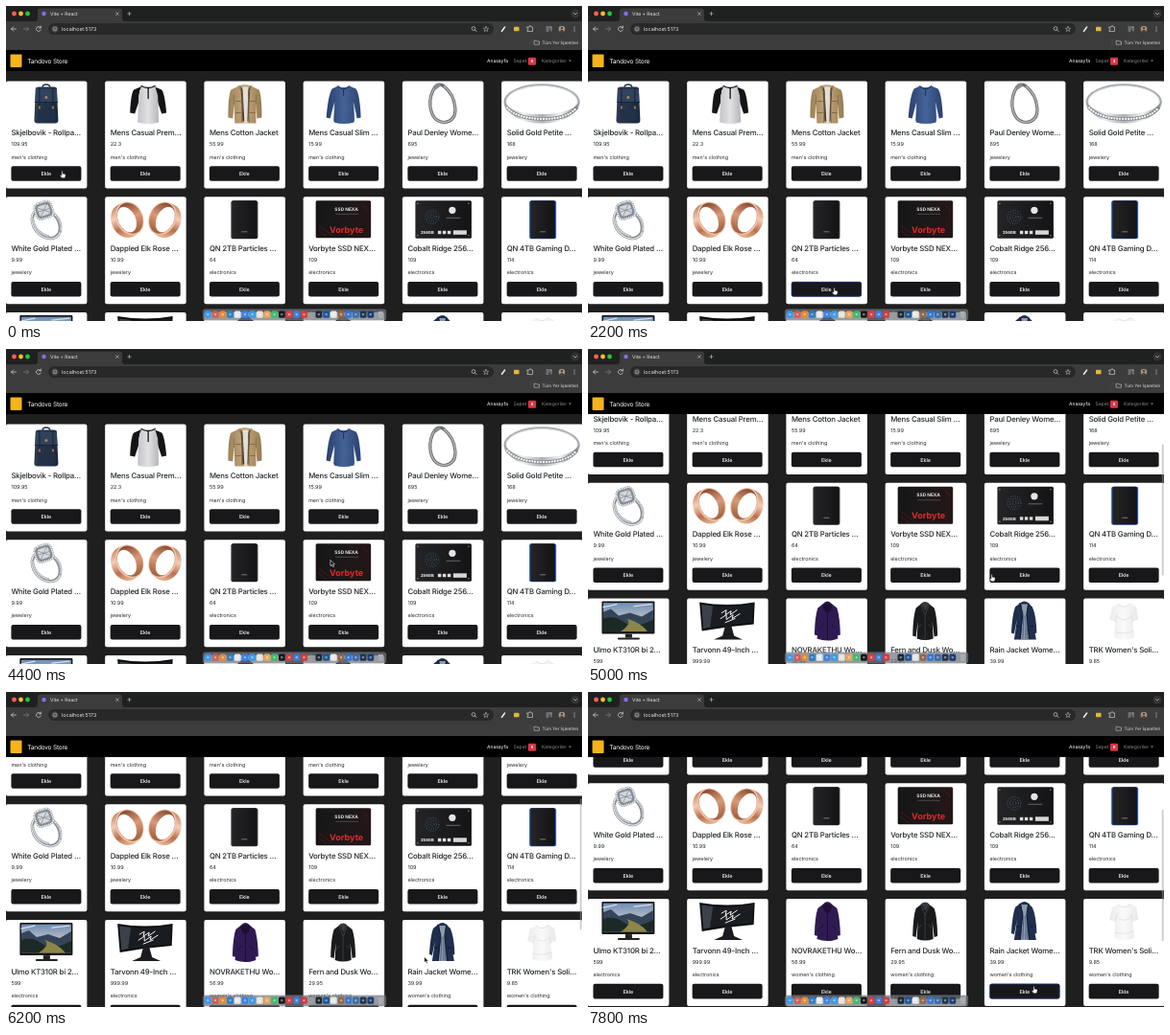
Animation, 600 px wide and 329 px high, one loop 8000 ms. Source, as an HTML page:

```html
<!DOCTYPE html>
<html lang="tr">
<head>
<meta charset="utf-8">
<title>Store page</title>
<style>
html, body { margin: 0; width: 100%; height: 100%; overflow: hidden; background: #1f1f1f; }
svg { display: block; width: 600px; height: 329px; font-family: Inter, Roboto, sans-serif; text-rendering: geometricPrecision; }
.title { font-weight: 500; letter-spacing: -.17px; }
</style>
</head>
<body>
<svg id="stage" viewBox="0 0 600 329"></svg>
<script>
const LOOP = 8000, STEP = 200;
const COL = 103.25, ROW = 120.8, LEFT = -.1, TOP = 78.5;

const rect = (x, y, w, h, fill, r = 0, more = '') =>
  `<rect x="${x}" y="${y}" width="${w}" height="${h}" rx="${r}" fill="${fill}" ${more}/>`;
const circle = (x, y, r, fill, more = '') => `<circle cx="${x}" cy="${y}" r="${r}" fill="${fill}" ${more}/>`;
const path = (d, fill, more = '') => `<path d="${d}" fill="${fill}" ${more}/>`;
const line = (d, color, w = .7, more = '') =>
  path(d, 'none', `stroke="${color}" stroke-width="${w}" stroke-linecap="round" stroke-linejoin="round" ${more}`);
const disc = (x, y, rx, ry, fill, more = '') =>
  `<ellipse cx="${x}" cy="${y}" rx="${rx}" ry="${ry}" fill="${fill}" ${more}/>`;
const oval = (x, y, rx, ry, color, w, more = '') =>
  disc(x, y, rx, ry, 'none', `stroke="${color}" stroke-width="${w}" ${more}`);
const text = (x, y, s, size, fill, more = '') =>
  `<text x="${x}" y="${y}" font-size="${size}" fill="${fill}" ${more}>${s}</text>`;
const group = (s, more) => `<g ${more}>${s}</g>`;
const grad = (id, stops, dir = '') =>
  `<linearGradient id="${id}" ${dir}>${stops.map((c, i) =>
    `<stop offset="${i / (stops.length - 1)}" stop-color="${c}"/>`).join('')}</linearGradient>`;
const down = 'x2="0" y2="1"';

// Product pictures, drawn relative to the card corner
const backpack = () =>
  line('M38 7Q38 3.5 42 3.5T46 7', '#2a3445', 1.3) +
  path('M31 8Q31 6 34 6H50Q53 6 53 8L54.5 41Q54.5 44 51 44H33Q29.5 44 29.5 41Z', 'url(#navy)') +
  path('M31 8H53L53.6 22H30.4Z', '#30425c') +
  line('M35 7V32M49 7V32M30.4 22H53.6', '#172235', 1) +
  rect(33, 30, 18, 11, '#223147', 1) + circle(42, 17, 1.5, '#a58a55') + rect(34, 26, 2, 3, '#96743f') + rect(48, 26, 2, 3, '#96743f');

const raglan = () =>
  path('M39 5L30 9Q27 12 26 33L31 34L35 22L36 10ZM50 5L59 9Q62 12 64 33L59 34L55 22L53 10Z', '#141416') +
  path('M38 5Q45 8 52 5L55 15L56 43Q45 46 34 43L35 15Z', 'url(#gray)') +
  line('M38 5Q45 9 52 5', '#151515', 1.4) + line('M45 8V18', '#222', 1.4);

const coat = () =>
  path('M36 5Q42 2 49 5L57 9Q60 14 60 38L55 39L54 24L54 44H32L31 24L30 39L25 38Q25 14 28 9Z', 'url(#tan)') +
  path('M38 5L43 14L48 5L46 42H40Z', '#4a3c2d') + path('M40 6H46L45 44H42Z', '#e2ded5') +
  line('M36 5L40 13L39 43M49 5L46 13L47 43M31 24V15M54 24V15', '#846b48', .8) +
  line('M33 21H38M48 21H53M33 33H38M48 33H53', '#846b48', 1);

const longSleeve = () =>
  path('M36 5Q42 8 48 5L55 8Q59 14 60 38L56 39L52 20L53 43Q42 46 32 43L33 20L28 39L24 38Q26 14 30 8Z', 'url(#blue)') +
  line('M36 5Q42 12 48 5M42 9V15', '#1b2e54', 1) + line('M33 20L32 41M52 20L53 41', '#24406f', .7);

const bracelet = () =>
  line('M34 6Q28 15 29 26Q31 42 43 43Q56 42 55 28Q54 14 43 5Q37 2 34 6Z', '#66696c', 3.2) +
  line('M34 6Q28 15 29 26Q31 42 43 43Q56 42 55 28Q54 14 43 5', '#c0c2c3', 1.3, 'stroke-dasharray="1 1"') +
  rect(32, 3.5, 8, 4, '#888b8f', 1.5, 'transform="rotate(-35 36 5)"');

const band = () =>
  oval(42, 22, 38.5, 18, '#a9adb2', 2.4) + oval(42, 21.5, 37, 16.5, '#e4e6e8', 1) +
  path('M2.8 20Q8 44 42 44T81.2 20Q76 34 42 34.5T2.8 20Z', 'url(#silver)') +
  line('M6 28Q16 39 42 39.5T78 28', '#85898e', 3.6) +
  line('M6 28Q16 39 42 39.5T78 28', '#fff', 2.3, 'stroke-dasharray="0 2.9"');

const solitaire = () => group(
  oval(42, 28, 17, 12.5, '#858a91', 3.4) + oval(42, 28, 17.6, 13, '#e6e8ea', 1.3), 'transform="rotate(50 42 28)"') +
  line('M50 18Q59 24 57 36M28 23Q30 37 44 41', '#a5aab0', 2.4) +
  line('M50 18Q59 24 57 36M28 23Q30 37 44 41', '#fff', 1.2, 'stroke-dasharray="0 1.9"') + group(
  rect(29.5, 4.5, 20, 19, '#878c94', 6) +
  rect(30.5, 5.5, 18, 17, 'none', 5, 'stroke="#f2f3f5" stroke-width="1.7" stroke-dasharray="1.5 .7"') +
  rect(33.5, 8.5, 12, 11, '#d3d8de', 3) +
  line('M34 10L45 18M35 19L44 9M34 14H45', '#7a818a', .6), 'transform="rotate(-18 39.5 14)"');

// A broad ring seen at an angle; side is the direction its opening faces
const roseRing = (x, side) => group(
  disc(x - side * 2, 24, 15, 18.5, 'url(#rose)') + disc(x + side * 2.5, 23.5, 14, 18, '#f0c3a9') +
  disc(x + side * 3, 23.5, 12.7, 16.7, 'url(#inner)') + disc(x - side * .5, 23.5, 9, 14, '#fff'),
  `transform="rotate(${-25 * side} ${x} 24)"`);
const roseRings = () => roseRing(23.5, 1) + roseRing(62, -1);

const drive = (x, edge) =>
  rect(x, 4, 28, 40, edge, 2) + rect(x + 1.2, 4, 25.6, 39.5, 'url(#black)', 1.5) + rect(x + 11, 36, 6, 1, '#777');

const ssdRed = () =>
  rect(13, 4, 57.5, 39, 'url(#ember)', 1.5) + line('M16 30L30 40M16 35L24 41M62 8L68 14', '#5b181b', .8) +
  text(45, 14.5, 'SSD NEXA', 4.8, '#e8e8e8', 'font-weight="700" text-anchor="middle"') + line('M34 18H57', '#777', .5) +
  text(45, 37.5, 'Vorbyte', 9, '#e02b28', 'font-weight="700" text-anchor="middle"');

const ssdDark = () =>
  rect(13.5, 4, 58.5, 39.5, 'url(#black)', 1.5) +
  [2, 4.5, 7].map(r => circle(31, 21, r, 'none', 'stroke="#58708a" stroke-width="1" stroke-dasharray=".8 1.6"')).join('') +
  circle(52, 14, 3.6, '#e5e5e5') + line('M46 22H60', '#999', .6) +
  [[16, 7], [69, 7], [16, 40.5], [69, 40.5]].map(([x, y]) => circle(x, y, .8, '#888')).join('') +
  text(19, 39, '256GB', 4.2, '#fff', 'font-weight="700"') +
  [37, 42, 47].map(x => rect(x, 35.5, 3.4, 3.4, '#ddd')).join('') + rect(53, 35, 14, 4.5, '#d6d6d6');

const monitor = () =>
  rect(14.5, 3, 55, 34, '#111', 1) + rect(16, 4.5, 52, 30, 'url(#dusk)') +
  path('M16 14L24 11L32 18L44 15L56 19L68 12V34.5H16Z', '#34455a') +
  path('M16 21Q28 17 38 25T68 22V34.5H16Z', '#1b2a27') +
  path('M34 34.5Q47 26 40 21Q55 25 62 34.5Z', '#8d8648') + line('M16 9L30 6M48 8L66 6', '#d9dfe6', 1.2) +
  rect(39, 37, 7, 4, '#222') + rect(31, 41, 23, 1.8, '#222', 1);

const ultrawide = () =>
  path('M13 4Q42 9 70.5 4L69.5 27Q43 29 15.5 34Z', '#0c0d0f') + path('M15 6.5Q42 10.5 69 6L68 25.5Q43 27 17 31.5Z', '#191c20') +
  path('M15 6.5L27 8L24 30L17 31.5Z', '#3a4148') +
  line('M36 15L41 12L40 17L46 13L45 17L52 12M35 21L41 17L41 22L48 17L47 21L55 16M40 25L50 21', '#f2f2f2', 1) +
  path('M40 28L46 28L49 39L58 43H28L37 39Z', '#1b1c1f');

const hoodie = (fill, dark) =>
  path('M38 6Q43 0 48 6L53 10Q56 20 56.5 38L53 39L51.5 27L54 42Q43 46 32 42L34.5 27L33 39L29.5 38Q30 18 33 10Z', fill) +
  path('M38 7Q43 3 48 7Q47 14 43 15Q39 14 38 7Z', dark) + line('M43 14V43M35 31L39 27M51 31L47 27', dark, 1);

const leather = () =>
  path('M37 6Q41.5 2 46 6L51 10Q54 18 54.5 39L51 40L49 24L50 42Q41.5 45 33 42L34 24L32 40L28.5 39Q29 18 32 10Z', '#1a1b1d') +
  path('M37.5 5Q41.5 2 45.5 5L42 13Z', '#393a3d') +
  line('M37 6L41.5 17V42M46 6L41.5 17M35 30L38 27M45 27L48 30', '#505156', .6);

const raincoat = () =>
  path('M37 5Q42 1 46 5L50 9Q54 18 54.5 36L51 37L50 22L54 43H31L34 22L31 37L28 36Q29 18 32 9Z', '#1f2e4c') +
  path('M38.5 6H45L44 18L46 43H38L40 18Z', '#8d9bad') + line('M41 18L40 42M43 18V42M44.5 20L45 42', '#3b506d', .8) +
  line('M37 5L40 16L37 42M46 5L44 16L47 42M34 29H37M48 29H51', '#101a30', 1);

const blouse = () =>
  path('M36 6Q43 11 49 5L55 9L57 22L51 24L53 41Q43 45 32 41L33 24L27 22L30 9Z', 'url(#white)') +
  line('M36 6Q43 12 49 5M33 24L35 16M51 24L50 16M33 35Q43 38 52 34M37 20Q43 25 49 19', '#d3d4d8', .6);

const MEN = "men's clothing", WOMEN = "women's clothing", GEM = 'jewelery', TECH = 'electronics';
const products = [
  ['Skjelbovik - Rollpa…', 109.95, MEN, backpack],
  ['Mens Casual Prem…', 22.3, MEN, raglan],
  ['Mens Cotton Jacket', 55.99, MEN, coat],
  ['Mens Casual Slim …', 15.99, MEN, longSleeve],
  ['Paul Denley Wome…', 695, GEM, bracelet],
  ['Solid Gold Petite …', 168, GEM, band],
  ['White Gold Plated …', 9.99, GEM, solitaire],
  ['Dappled Elk Rose …', 10.99, GEM, roseRings],
  ['QN 2TB Particles …', 64, TECH, () => drive(28, '#303033')],
  ['Vorbyte SSD NEX…', 109, TECH, ssdRed],
  ['Cobalt Ridge 256…', 109, TECH, ssdDark],
  ['QN 4TB Gaming D…', 114, TECH, () => drive(29, '#2458c5')],
  ['Ulmo KT310R bi 2…', 599, TECH, monitor],
  ['Tarvonn 49-Inch …', 999.99, TECH, ultrawide],
  ['NOVRAKETHU Wo…', 56.99, WOMEN, () => hoodie('#2f1b52', '#1c0f33')],
  ['Fern and Dusk Wo…', 29.95, WOMEN, leather],
  ['Rain Jacket Wome…', 39.99, WOMEN, raincoat],
  ["TRK Women's Soli…", 9.85, WOMEN, blouse]
];

const spot = i => `translate(${LEFT + COL * (i % 6)} ${TOP + ROW * Math.floor(i / 6)})`;
const card = ([name, price, kind, draw], i) => group(
  rect(0, 0, 84.5, 112, '#fff', 2) + draw() +
  text(5.5, 56.6, name, 7.8, '#212529', 'class="title"') +
  text(5.5, 67.6, price, 5.5, '#212529') + text(5.5, 81, kind, 5.4, '#212529') +
  rect(5.5, 88.7, 73, 15.6, '#18181a', 2) +
  text(42, 98.5, 'Ekle', 5.4, '#fff', 'font-weight="500" text-anchor="middle"'), `transform="${spot(i)}"`);

const tabBar = () =>
  rect(0, 0, 600, 16, '#1f2020') +
  ['#ff5f57', '#febc2e', '#28c840'].map((c, i) => circle(8.5 + 7 * i, 8, 2.4, c)).join('') +
  path('M31 16Q33 15.5 33 13V5Q33 2.5 36 2.5H118Q121 2.5 121 5V13Q121 15.5 123 16Z', '#3c3c3c') +
  circle(39.5, 8, 2.2, '#8b6cf6') + text(46, 9.9, 'Vite + React', 5, '#e6e6e6') +
  line('M114.5 6.7L117.3 9.5M117.3 6.7L114.5 9.5M126.8 8H130.2M128.5 6.3V9.7', '#ccc', .6) +
  circle(593, 8, 4.6, '#333') + line('M591.4 7.4L593 9L594.6 7.4', '#ccc');

const toolbar = () =>
  rect(0, 16, 600, 30, '#3c3c3c') + rect(44, 18, 464, 12, '#282828', 6) +
  line('M10.5 24H5.5M7.7 21.8L5.5 24L7.7 26.2M36 22.4A2.5 2.5 0 1 0 36.3 25M36.4 21V22.9H34.5', '#ddd') +
  line('M18.5 24H23.5M21.3 21.8L23.5 24L21.3 26.2', '#818181') +
  circle(51, 24, 3.8, '#3c3c3c') + circle(51, 24, 2, 'none', 'stroke="#ccc" stroke-width=".6"') + line('M51 24V25', '#ccc', .6) +
  text(58, 26, 'localhost:5173', 5.4, '#e8e8e8') +
  circle(487, 23.5, 1.9, 'none', 'stroke="#ccc" stroke-width=".7"') + line('M488.5 25L490 26.5', '#ccc', .8) +
  line('M500 21.4L500.8 23.2L502.7 23.3L501.2 24.6L501.7 26.5L500 25.4L498.3 26.5L498.8 24.6L497.3 23.3L499.2 23.2Z', '#ccc', .5) +
  line('M516.5 26.3L519.6 22', '#eee', 1.5) + rect(529, 21.8, 5.5, 4.5, '#e0b73e', .6) +
  line('M543 22H545Q545 20.5 546 20.5T547 22H548.5V26.5H543V25Q544.2 25 544.2 24T543 23Z', '#ddd', .6) +
  line('M563 22H568M563 24H566M563 26H565M568 22V26', '#ddd', .6) +
  circle(579, 24, 3.3, '#a8927c') + circle(579, 23, 1.2, '#4c4038') + path('M576.6 26.5Q579 23 581.4 26.5Q579 28.3 576.6 26.5Z', '#4c4038') +
  [22, 24, 26].map(y => circle(592, y, .6, '#ddd')).join('') +
  line('M546 34.5V41.5', '#555', .5) + line('M550.5 36.2H552.4L553 37H555.5V40.2H550.5Z', '#ccc', .6) +
  text(558.5, 40, 'Tüm Yer İşaretleri', 4.6, '#ddd');

const navbar = () =>
  rect(0, 46, 600, 22, '#000') + rect(4.5, 50.5, 12, 13.5, '#f5b41b', 1) +
  text(22.3, 59.6, 'Tandovo Store', 6.5, '#fff', 'letter-spacing="-.2"') +
  text(501, 59.2, 'Anasayfa', 5, '#fff') + text(528.5, 59.2, 'Sepet', 5, '#8b8b8b') +
  rect(544, 53.7, 8, 8, '#dc3545', 1.2) +
  text(548, 59.2, '0', 4.2, '#fff', 'id="count" font-weight="700" text-anchor="middle"') +
  text(558, 59.2, 'Kategoriler', 5, '#8b8b8b') + path('M586 56.6H589L587.5 58.2Z', '#8b8b8b');

const icons = ['#3a9af0', '#cf5f58', '#e58a35', '#2c7fc4', '#e6e9ee', '#3b82e6', '#3c9bea', '#e9e2d5', '#e9a75d',
  '#42b96b', '#18191b', '#db3f42', '#3f7ddb', '#cf3d40', '', '#202934', '#1e5799', '#e7e9e7', '#93674a', '#3477d6',
  '#3a6da9', '#23364f', '#1c3d72'];
const dock = () =>
  rect(205.3, 316.8, 190.5, 11.4, '#70757c', 2.5, 'fill-opacity=".72" stroke="#a4a8ae" stroke-opacity=".5" stroke-width=".5"') +
  icons.map((c, i) => c ? rect(207 + 7.7 * i, 318.4, 6.8, 7.4, c, 1.6) +
    rect(209.2 + 7.7 * i, 321, 2.3, 2.3, '#fff', .7, 'opacity=".45"') : line('M318 319V326', '#aaa', .5)).join('') +
  path('M387.7 319H393L392.2 326H388.5Z', '#a9adb2');

const pointers =
  group(path('M-1.1 -3.4Q-.4 -4.2 .2 -3.4V-1L2.6 -.4Q3.4 0 3.1 1.2L2.5 3.8H-1L-2.9 1.1Q-2.8 .1 -1.8 .6L-1.1 1.1Z', '#fff',
    'stroke="#111" stroke-width=".6"'), 'id="hand"') +
  group(path('M-2 -3.5V2.5L-.6 1.3L.4 3.6L1.5 3.1L.5 .9H2.3Z', '#000', 'stroke="#fff" stroke-width=".6"'), 'id="arrow"');

const $ = id => document.getElementById(id);
$('stage').innerHTML = '<defs>' +
  grad('navy', ['#2b3a50', '#1c2a40']) + grad('gray', ['#c3c4c8', '#e1e1e3', '#b5b6ba']) +
  grad('tan', ['#9c8058', '#c4aa80', '#97794f']) + grad('blue', ['#283f6d', '#456398', '#2a426f']) +
  grad('silver', ['#83878c', '#eceef0', '#aeb1b6', '#f1f2f3', '#7e8288']) +
  grad('rose', ['#c98564', '#f5cdb4', '#b9714f', '#eab898'], down) + grad('inner', ['#8a4a30', '#d99a78', '#a1603f'], down) +
  grad('black', ['#242427', '#141416']) + grad('ember', ['#161617', '#1c1819', '#241617']) +
  grad('dusk', ['#6d8db5', '#b7bcc4', '#d0a06a'], down) + grad('white', ['#ebebee', '#fafafa', '#e8e8eb']) +
  '</defs>' + rect(0, 46, 600, 283, '#1f1f1f') +
  group(products.map(card).join('') + rect(5.8, 89, 72.4, 15, 'none', 2,
    'id="ring" stroke="#22328f" stroke-width=".7"'), 'id="page"') +
  rect(597.8, 68, 1.8, 137, '#999', .9, 'id="thumb" fill-opacity=".5"') +
  tabBar() + toolbar() + navbar() + dock() + group(pointers, 'id="cursor"');

// [time, scroll]
const scrolls = [[0, 0], [4400, 0], [4600, 13], [4800, 38], [5000, 59.5], [5200, 70], [5400, 76], [5600, 78.3],
  [6200, 82], [7000, 93], [7400, 102], [7600, 104], [8000, 104]];
// [time, x, y, hand]
const moves = [[0, 59, 176, 1], [400, 59, 176, 1], [600, 100, 177, 0], [1000, 152, 176, 1], [1400, 152, 176, 0],
  [1800, 240, 285, 0], [2000, 257, 298, 1], [2400, 257, 298, 0], [2800, 350, 297, 1], [3200, 350, 297, 0],
  [3800, 345, 177, 1], [4000, 345, 177, 0], [4400, 340, 224, 0], [5000, 421, 239, 1], [5200, 424, 248, 0],
  [5600, 431, 265, 0], [6400, 440, 285, 0], [7000, 467, 324, 1], [7800, 465, 311, 1], [8000, 465, 311, 1]];
// [time pressed, time left, product]
const clicks = [[200, 600, 0], [1000, 1600, 1], [2000, 2600, 8], [2800, 3400, 9], [3800, 4200, 3], [7000, 8000, 16]];

function at(keys, t) {
  const i = keys.findIndex(k => k[0] > t), a = keys[i - 1], b = keys[i];
  const p = (t - a[0]) / (b[0] - a[0]);
  return { a, v: a.map((n, j) => n + (b[j] - n) * p) };
}

function draw(now) {
  const t = Math.floor(now % LOOP / STEP) * STEP;
  const scroll = at(scrolls, t).v[1];
  $('page').setAttribute('transform', `translate(0 ${-scroll})`);
  $('thumb').setAttribute('y', 68 + scroll * .53);
  $('thumb').style.display = scroll ? '' : 'none';

  const { a, v } = at(moves, t);
  $('cursor').setAttribute('transform', `translate(${v[1]} ${v[2]})`);
  $('hand').style.display = a[3] ? '' : 'none';
  $('arrow').style.display = a[3] ? 'none' : '';

  $('count').textContent = clicks.filter(c => c[0] <= t).length;
  const active = clicks.find(c => c[0] <= t && t < c[1]);
  $('ring').style.display = active ? '' : 'none';
  if (active) $('ring').setAttribute('transform', spot(active[2]));
}

const start = performance.now();
function tick() {
  draw(performance.now() - start);
  requestAnimationFrame(tick);
}
tick();
</script>
</body>
</html>
```
